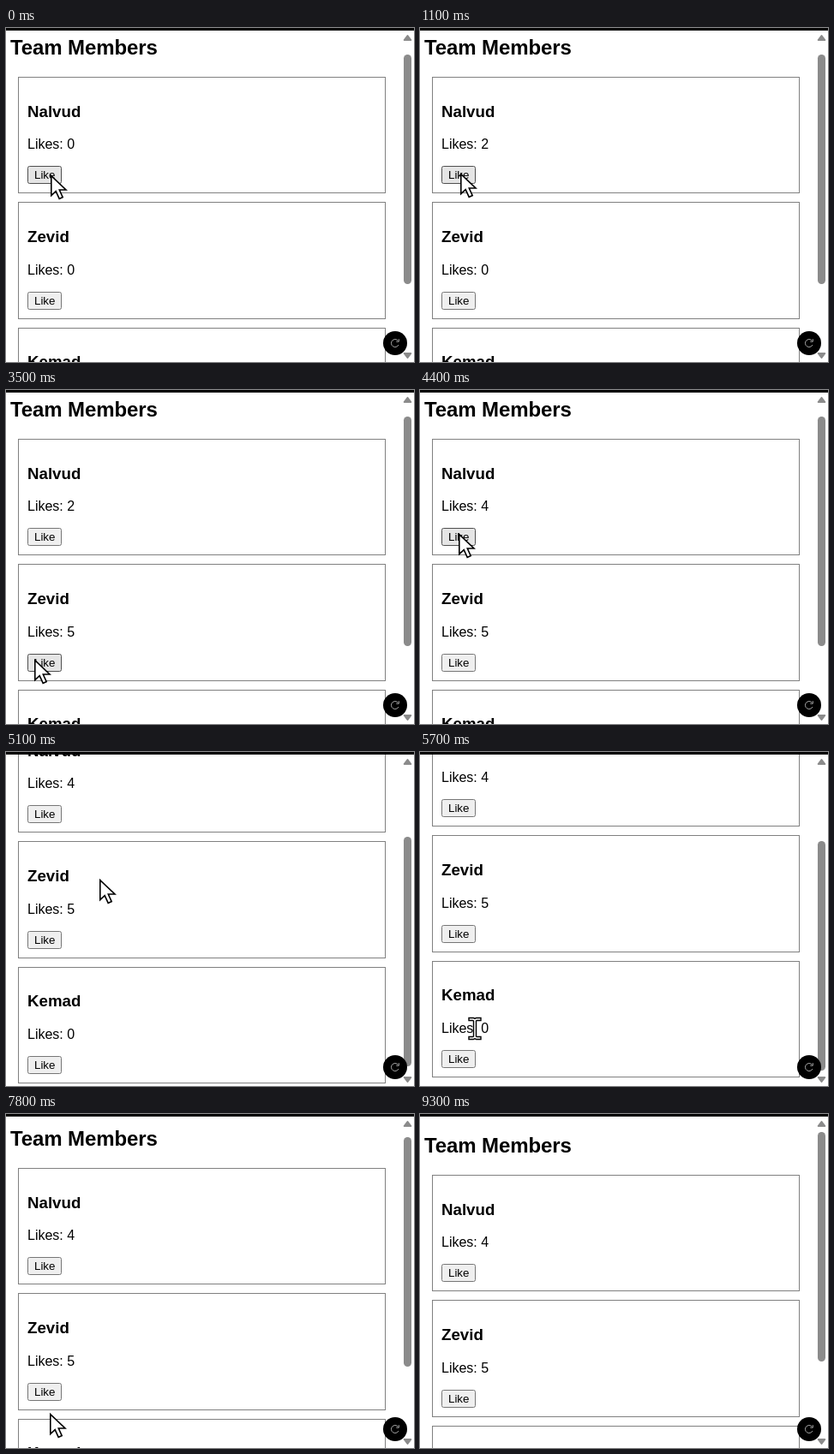
Write an HTML page that moves like this. It is 476 px wide and 390 px high and loops after 9.4 s.

```html
<!DOCTYPE html>
<html lang="en">
<head>
<meta charset="utf-8">
<title>Team Members</title>
<style>
  html, body { margin: 0; width: 100%; height: 100%; overflow: hidden; background: #fff; }
  body { position: relative; font: 16px/18px "Liberation Sans", Arial, sans-serif; color: #000; cursor: default; }
  #view { position: absolute; top: 3px; left: 0; width: 461px; bottom: 0; overflow: hidden; }
  #page { position: absolute; left: 4px; top: 0; width: 449px; display: flow-root; }
  h2 { font-size: 24px; line-height: 28px; margin: 19.92px 1px; letter-spacing: -.1px; }
  h3 { font-size: 18.72px; line-height: 22px; margin: 18.72px 0; }
  p { margin: 16px 0; width: fit-content; }
  .card { box-sizing: border-box; width: 429px; margin: 10px; padding: 10px; border: 1px solid #808080; display: flow-root; }
  button {
    display: block; box-sizing: border-box; height: 21px; margin: 0; padding: 0 7px;
    font: 13.333px/19px "Liberation Sans", Arial, sans-serif; color: #000;
    background: #efefef; border: 1px solid #767676; border-radius: 2.5px;
  }
  button.hover { background: #e5e5e5; border-color: #4f4f4f; }
  button.down { background: #f5f5f5; border-color: #8d8d8d; }
  #bar { position: absolute; top: 0; left: 0; width: 100%; height: 3px; background: #000; }
  svg { position: absolute; left: 0; top: 0; pointer-events: none; }
</style>
</head>
<body>
<div id="view">
  <div id="page"><h2>Team Members</h2></div>
</div>
<svg width="476" height="390" viewBox="0 0 476 390">
  <defs>
    <path id="caret" d="M-5.5 -11H-2L0 -10L2 -11H5.5M-5.5 11H-2L0 10L2 11H5.5M0 -10V10"/>
  </defs>
  <g fill="#8b8b8b" stroke="#8b8b8b" stroke-width="2" stroke-linejoin="round">
    <path d="M468.5 9L472.3 14H464.7Z"/>
    <path d="M468.5 385L472.3 380H464.7Z"/>
  </g>
  <rect id="thumb" x="464" y="21" width="9" height="268" rx="4.5" fill="#8b8b8b"/>
  <circle cx="454" cy="368" r="14" fill="#000"/>
  <g fill="none" stroke="#a8a8a8">
    <path d="M458 370A4.5 4.5 0 1 1 457.3 365"/>
    <path d="M458.3 363.2V366.2H455.3"/>
  </g>
  <path id="arrow" d="M.8 1.6V24.6L6.2 19.6L10.2 28.4L14.2 26.6L10.3 18H18Z" fill="#fff" stroke="#000" stroke-width="1.6"/>
  <g id="beam" fill="none" stroke-linecap="square">
    <use href="#caret" stroke="#000" stroke-width="4.4"/>
    <use href="#caret" stroke="#fff" stroke-width="1.6"/>
  </g>
</svg>
<div id="bar"></div>
<script>
const LOOP = 9400, STEP = 100, HOLD = 200;
const $ = id => document.getElementById(id);

const cards = ["Nalvud", "Zevid", "Kemad"].map(name => {
  const card = document.createElement("div");
  card.className = "card";
  card.innerHTML = `<h3>${name}</h3><p>Likes: 0</p><button type="button" tabindex="-1">Like</button>`;
  $("page").append(card);
  return { likes: card.querySelector("p"), button: card.querySelector("button") };
});

const scrollMoves = [
  { from: 4900, to: 5200, at: [120] },
  { from: 7600, to: 7900, at: [0] }
];

const pointerMoves = [
  { from: 200, to: 300, at: [47, 169] },
  { from: 1300, to: 1400, at: [53, 181] },
  { from: 1600, to: 1900, at: [35, 325] },
  { from: 2100, to: 2300, at: [33, 314] },
  { from: 3700, to: 4200, at: [45, 167] },
  { from: 4400, to: 4800, at: [109, 148] },
  { from: 5200, to: 5700, at: [64, 323] },
  { from: 5700, to: 5900, at: [51, 349] },
  { from: 8900, to: 9200, at: [51, 400] }
];

// Runs of evenly spaced clicks; "first" is the first release
const runs = [
  { card: 0, first: 500, gap: 600, count: 2 },
  { card: 1, first: 2500, gap: 250, count: 5 },
  { card: 0, first: 4350, gap: 50, count: 2 },
  { card: 2, first: 6200, gap: 300, count: 3 }
];
const clicks = runs.flatMap(r =>
  Array.from({ length: r.count }, (_, i) => ({ card: r.card, up: r.first + i * r.gap })));

const easeOut = f => 1 - (1 - f) ** 2.5;

// Position at time t after easing through each move in turn
function follow(start, moves, t) {
  return moves.reduce((pos, { from, to, at }) => {
    const f = easeOut(Math.min(1, Math.max(0, (t - from) / (to - from))));
    return pos.map((v, i) => v + (at[i] - v) * f);
  }, start).map(Math.round);
}

function contains(el, x, y) {
  const r = el.getBoundingClientRect();
  return x >= r.left && x < r.right && y >= r.top && y < r.bottom;
}

function draw(t) {
  const [scroll] = follow([14], scrollMoves, t);
  const [x, y] = follow([52, 171], pointerMoves, t);
  $("page").style.top = -scroll + "px";
  $("thumb").setAttribute("y", Math.round(21 + scroll * 0.692));

  cards.forEach(({ likes, button }, i) => {
    const own = clicks.filter(c => c.card === i);
    likes.textContent = "Likes: " + own.filter(c => c.up <= t).length;
    const down = own.some(c => c.up - HOLD <= t && t < c.up);
    button.className = down ? "down" : contains(button, x, y) ? "hover" : "";
  });

  const overText = cards.some(c => contains(c.likes, x, y));
  $("arrow").style.display = overText ? "none" : "";
  $("beam").style.display = overText ? "" : "none";
  $(overText ? "beam" : "arrow").setAttribute("transform", `translate(${x} ${y})`);
}

const start = performance.now();
let last = -1;
function tick() {
  const t = Math.floor(((performance.now() - start) % LOOP) / STEP) * STEP;
  if (t !== last) draw(last = t);
  requestAnimationFrame(tick);
}
tick();
</script>
</body>
</html>
```
